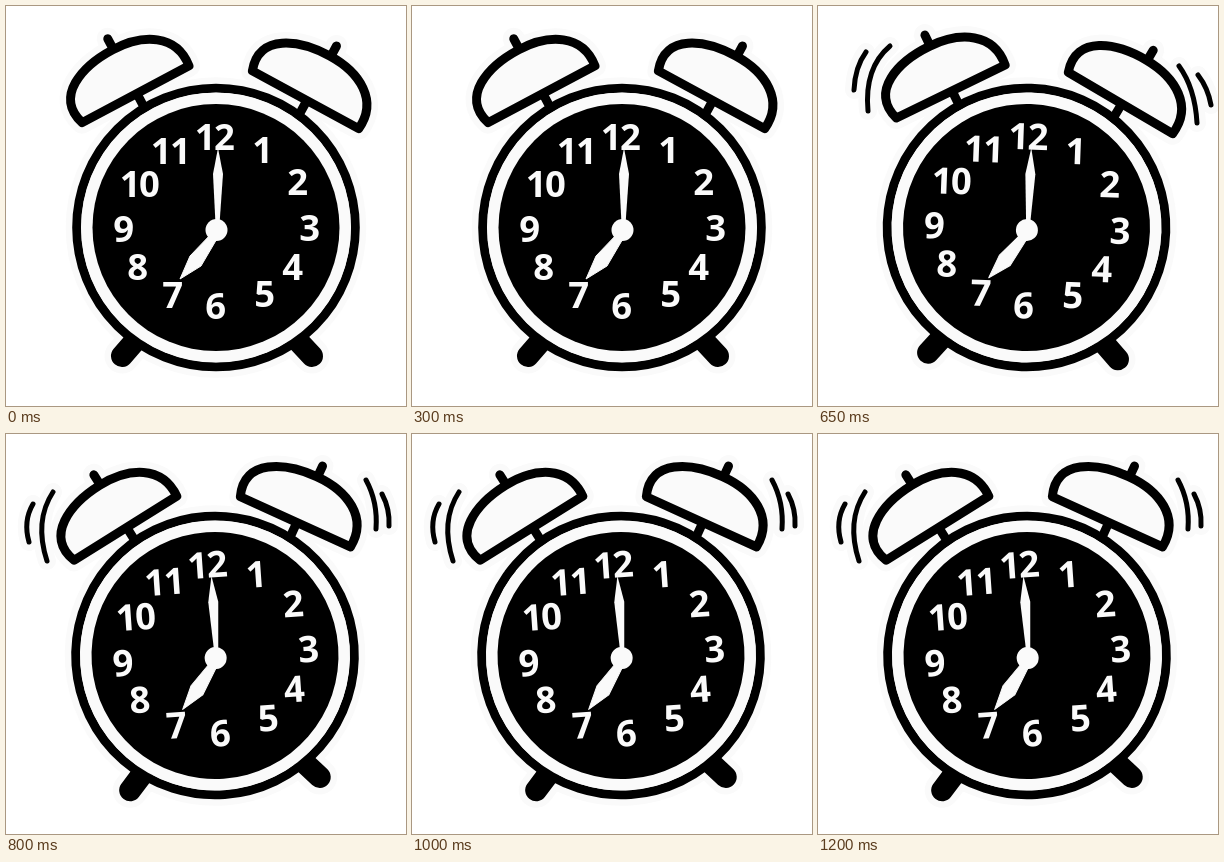
Animation of 400 by 400 pixels, one loop 1.25 s. Source, as an HTML page:

```html
<!DOCTYPE html>
<html lang="en">
<head>
<meta charset="utf-8">
<title>Ringing alarm clock</title>
<style>
  html, body { margin: 0; width: 100%; height: 100%; overflow: hidden; background: #fff; }
  svg { display: block; width: 100%; height: 100%; }
  .outline { --pad: 0px; fill: none; stroke: #000; stroke-linecap: round; stroke-linejoin: round; }
  .halo { --pad: 13px; stroke: #fafafa; }
  .dome { stroke-width: calc(9px + var(--pad)); fill: #fafafa; }
  .rod { stroke-width: calc(9px + var(--pad)); }
  .foot { stroke-width: calc(22px + var(--pad)); }
  .rim { stroke-width: calc(9px + var(--pad)); }
  .marks { stroke-width: calc(5px + var(--pad)); }
  .light { fill: #fafafa; }
  .digits {
    font: 650 36.5px "Open Sans", "Noto Sans", sans-serif;
    font-stretch: 87%;
    letter-spacing: -1.5px;
    text-anchor: middle;
  }
</style>
</head>
<body>
<svg viewBox="0 0 400 400">
  <defs>
    <g id="bell">
      <path class="rod" d="M1 4V15M1 -50V-62"/>
      <path class="dome" d="M-61 0C-74 -36 -34 -50 0 -50S64 -34 60 0Z"/>
    </g>
    <g id="body">
      <path class="foot" d="M129 335L116 350M292 335L306 350"/>
      <use href="#bell" transform="translate(130 88) rotate(-28)"/>
      <use href="#bell" transform="translate(300 94) rotate(28.5)"/>
      <circle class="rim" cx="210" cy="221.5" r="139.3"/>
    </g>
  </defs>
  <path class="outline halo marks"/>
  <g class="clock">
    <use class="outline halo" href="#body"/>
    <use class="outline" href="#body"/>
    <circle class="light" cx="210" cy="221.5" r="135"/>
    <circle cx="210" cy="221.5" r="123.5"/>
    <g class="light digits"></g>
    <g class="light">
      <path d="M212 142L217 168L213.500 218H209.500L207 168Z"/>
      <path d="M174 273L184 250L206 227L212 231L195 260Z" stroke="#fafafa" stroke-linejoin="round"/>
      <circle cx="210.500" cy="224" r="11"/>
    </g>
  </g>
  <path class="outline marks"/>
</svg>
<script>
  const LOOP = 1250, HOLD = 200, STEP = 50;

  const poses = {
    rest: { angle: 0, shift: 0, marks: "" },
    right: {
      angle: 2, shift: -1.5,
      marks: "M48 46Q37 61 36 84M72 40Q46 62 50 105M361 60Q377 82 379 117M380 69Q390 82 393 99"
    },
    left: {
      angle: -4, shift: -1,
      marks: "M27 70Q17 87 23 108M47 58Q28 87 41 127M360 46Q372 68 370 95M376 60Q384 75 383 92"
    }
  };

  // Digit centres, from 1 to 12
  const centres = [
    [256, 144], [291, 176], [303, 222], [286, 261], [258, 288], [209, 300],
    [166, 289], [131, 261], [117, 223], [133, 178], [164, 145], [208, 131]
  ];
  document.querySelector(".digits").innerHTML = centres
    .map(([x, y], i) => `<text x="${x}" y="${y + 12.5}">${i + 1}</text>`)
    .join("");

  const clock = document.querySelector(".clock");
  const marks = document.querySelectorAll(".marks");

  // A short ring, a pause, then a long ring
  function poseAt(time) {
    const step = time < HOLD ? 0 : 1 + Math.floor((time - HOLD) / STEP);
    if (step === 0 || step === 3) return poses.rest;
    if (step < 3) return step === 1 ? poses.right : poses.left;
    return step % 2 ? poses.left : poses.right;
  }

  function draw(time) {
    const pose = poseAt(time % LOOP);
    clock.setAttribute("transform", `translate(${pose.shift} 0) rotate(${pose.angle} 210 221.5)`);
    marks.forEach(path => path.setAttribute("d", pose.marks));
  }

  const start = performance.now();
  function tick() {
    draw(performance.now() - start);
    requestAnimationFrame(tick);
  }
  tick();
</script>
</body>
</html>
```
